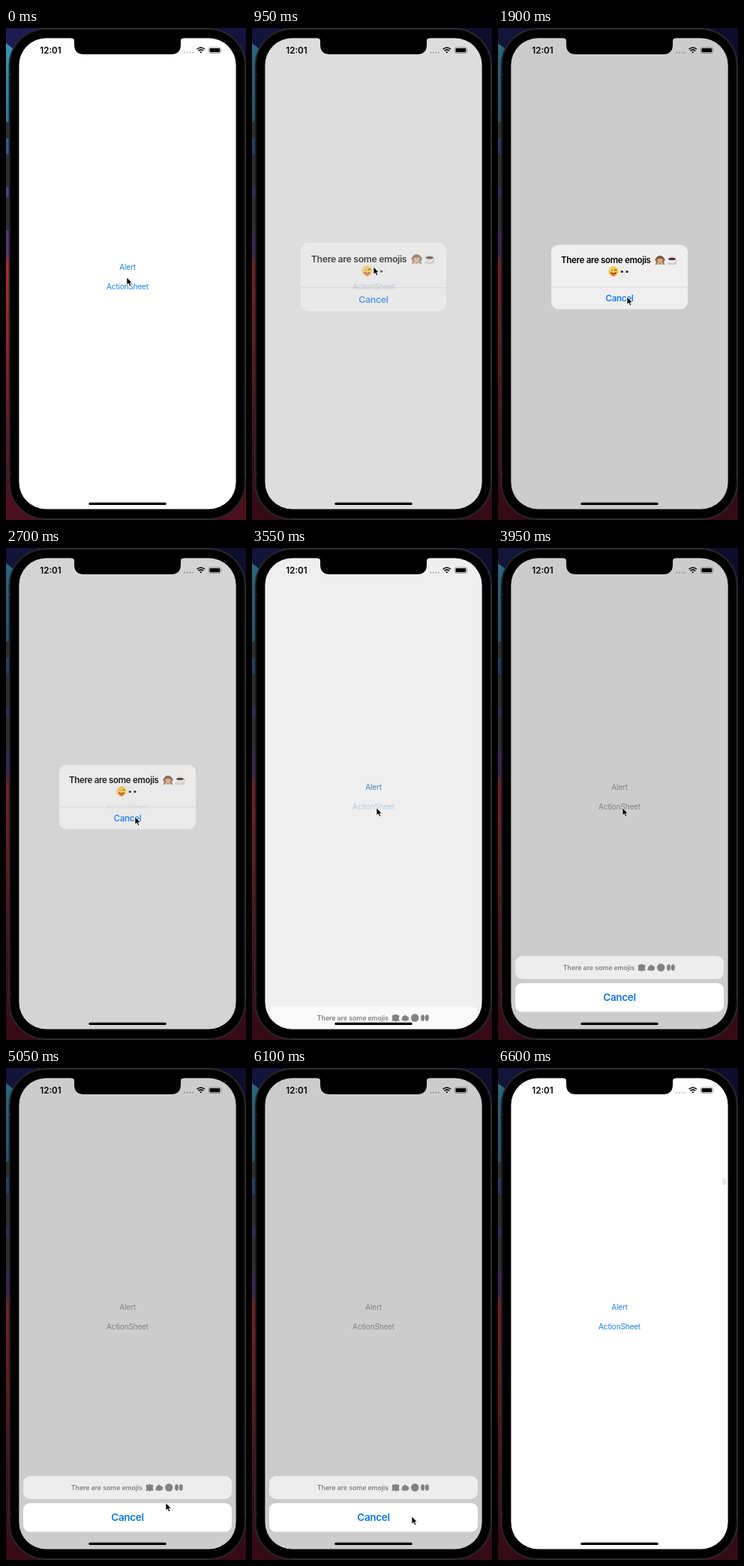
Animation of 320x655 px, one loop 7270 ms. Source, as an HTML page:

```html
<!DOCTYPE html>
<html lang="en">
<head>
<meta charset="utf-8">
<title>Alert and action sheet</title>
<style>
  html, body { margin: 0; width: 100%; height: 100%; overflow: hidden; background: #000; }
  svg { display: block; width: 320px; height: 655px; font-family: Inter, Roboto, sans-serif; }
  .mid { text-anchor: middle; }
  .link { font-size: 10px; letter-spacing: -.015em; }
  .bold { font-weight: 600; letter-spacing: -.026em; }
</style>
</head>
<body>
<svg viewBox="0 0 320 655">
  <defs>
    <linearGradient id="wall" x2="0" y2="1">
      <stop offset=".03" stop-color="#3a92b8"/>
      <stop offset=".17" stop-color="#2f7aa6"/>
      <stop offset=".25" stop-color="#2b5796"/>
      <stop offset=".33" stop-color="#45408c"/>
      <stop offset=".46" stop-color="#5e3079"/>
      <stop offset=".48" stop-color="#ad2b30"/>
      <stop offset=".62" stop-color="#9c2426"/>
      <stop offset=".85" stop-color="#5c1424"/>
      <stop offset="1" stop-color="#4a0f20"/>
    </linearGradient>
    <clipPath id="screen"><rect x="17.4" y="13.4" width="289.200" height="627.200" rx="36"/></clipPath>
    <clipPath id="card"><rect x="71" y="288.7" width="182" height="85.6" rx="9.5"/></clipPath>
  </defs>

  <!-- desktop and phone body -->
  <rect width="160" height="655" fill="url(#wall)"/>
  <path d="M0 0H160V60H50L0 20Z" fill="#1d1b52"/>
  <path d="M160 0H320V330H160Z" fill="#15133f"/>
  <path d="M160 330H320V655H160Z" fill="#4d0f20"/>
  <rect id="shade" width="320" height="655" opacity="0"/>
  <path d="M0 125H5V147H0ZM0 168H5V212H0ZM0 225H5V269H0Z" fill="#2c2d31"/>
  <rect x="4" y=".5" width="315.5" height="654" rx="49" fill="#000" stroke="#363638"/>
  <rect x="5.2" y="1.7" width="313" height="651.6" rx="47.8" fill="none" stroke="#202021" stroke-width="1.4"/>
  <path d="M4 62H6.500M317.500 62H320M4 593H6.500M317.500 593H320" stroke="#2e2e2f" stroke-width="2"/>

  <g clip-path="url(#screen)">
    <rect x="17" y="13" width="290" height="628" fill="#fff"/>
    <text id="alertLink" class="mid link" x="162" y="322.3">Alert</text>
    <text id="sheetLink" class="mid link" x="162" y="348">ActionSheet</text>

    <!-- status bar -->
    <text x="45.3" y="34" font-size="11.6" font-weight="600">12:01</text>
    <path d="M238.3 32.8h.01M242 32.8h.01M245.6 32.8h.01M249.2 32.8h.01" stroke="#b5b5b5" stroke-width="2" stroke-linecap="round"/>
    <g fill="none" stroke="#000" stroke-width="1.5">
      <path d="M254.6 28.3Q259.8 23.7 265 28.3M256.5 30.4Q259.8 27.4 263.1 30.4"/>
      <path d="M258.2 31.8Q259.8 30.5 261.4 31.8L259.8 33.5Z" fill="#000" stroke="none"/>
    </g>
    <rect x="270.4" y="25.9" width="16" height="7.6" rx="2.2" fill="none" stroke="#8a8a8a" stroke-width=".8"/>
    <rect x="271.6" y="27.1" width="13.6" height="5.2" rx="1.1"/>
    <path d="M287.3 28.4q1.2 1.3 0 2.6z" fill="#8a8a8a"/>
    <path id="ghost" d="M299 145L306.5 151V158L303 155L299 156Z" fill="#e9ebeb"/>
    <rect id="dim" x="17" y="13" width="290" height="628" opacity="0"/>

    <!-- alert -->
    <g id="alert">
      <g clip-path="url(#card)">
        <rect x="71" y="288" width="182" height="87" fill="#efefef"/>
        <rect id="alertPress" x="71" y="345" width="182" height="30" fill="#d9d9d9"/>
        <path d="M71 344.8H253" stroke="#d2d2d2" stroke-width=".8"/>
      </g>
      <text class="bold" x="84" y="313" font-size="11.5">There are some emojis</text>
      <g transform="translate(216 309)">
        <circle cx="-5" cy="-.6" r="2" fill="#c99d77"/>
        <circle cx="5" cy="-.6" r="2" fill="#c99d77"/>
        <circle r="5.9" fill="#7d5a40"/>
        <ellipse cy="3" rx="4.2" ry="3" fill="#e2bf98"/>
        <path d="M-6.5 6.500L-4 -1L0 -2.2L4 -1L6.5 6.500L3.5 5.5L1.5 1.5H-1.5L-3.5 5.5Z" fill="#a67c5b"/>
        <path d="M-3.6 -1.2L-.4 -2V1.4H-3ZM3.6 -1.2L.4 -2V1.4H3Z" fill="#dcb58d"/>
        <path d="M-1.4 4.2Q0 5 1.4 4.2" fill="none" stroke="#5b3b28" stroke-width=".7"/>
      </g>
      <g transform="translate(232 309)">
        <ellipse cy="4.5" rx="6.7" ry="1.7" fill="#c9cccf"/>
        <path d="M4 -.8Q7.4 -1.2 6 1.6Q5 3 3 2.6" fill="none" stroke="#b7babd" stroke-width="1.1"/>
        <path d="M-4.8 -1.6H4.8Q4.6 4.6 0 4.6Q-4.6 4.6 -4.8 -1.6Z" fill="#e3e5e7"/>
        <ellipse cy="-1.6" rx="4.8" ry="1.7" fill="#4c3023"/>
        <path d="M-1.5 -3.5q-1 -1.2 0 -2.4M1.5 -3.5q-1 -1.2 0 -2.4" fill="none" stroke="#bbb" stroke-width=".8"/>
      </g>
      <g transform="translate(154 324)">
        <circle r="6.7" fill="#f8c83c"/>
        <circle cx="-2.4" cy="-1.6" r="1.7" fill="#fff"/>
        <circle cx="-2.2" cy="-1.5" r=".9" fill="#4b2e12"/>
        <path d="M1.2 -1.4Q2.8 -3 4.3 -1.4" fill="none" stroke="#4b2e12" stroke-width="1"/>
        <path d="M-4 1.2Q0 2.8 4 1.2Q3.4 4.4 0 4.4Q-3.4 4.4 -4 1.2Z" fill="#6c3615"/>
        <path d="M-1.9 2.5H1.9V4.8Q1.6 6.4 0 6.4Q-1.6 6.4 -1.9 4.8Z" fill="#ee5564"/>
      </g>
      <g transform="translate(169.5 324)">
        <g fill="#fff" stroke="#c8c8c8" stroke-width=".6">
          <ellipse cx="-3.4" rx="3" ry="4.9"/><ellipse cx="3.4" rx="3" ry="4.9"/>
        </g>
        <circle cx="-4.2" cy=".4" r="1.6" fill="#222"/><circle cx="2.6" cy=".4" r="1.6" fill="#222"/>
      </g>
      <text class="mid bold" x="162" y="363.6" font-size="11.5" fill="#1a7ef0">Cancel</text>
    </g>

    <!-- action sheet -->
    <g id="sheet">
      <rect x="23" y="543.3" width="278" height="30.4" rx="8.8" fill="#fff" opacity=".66"/>
      <g fill="#828282">
        <text x="86.8" y="561.8" font-size="8.8" font-weight="600" letter-spacing="-.05">There are some emojis</text>
        <path d="M187 555.2Q188 554 189 555Q191.5 552.8 194 555Q195 554 196 555.2Q197 557 195.7 558.5L196.5 563L193.5 562.5Q191.5 564.5 189.5 562.5L186.5 563L187.3 558.5Q186 557 187 555.2Z"/>
        <path d="M200.3 557.2Q202 555.8 203.3 555.6L204 553.7L205.2 555.7Q207.5 556 208.3 557.5Q210.4 558.3 208.6 560Q210 560.8 208.5 561.7Q204.5 563.8 200.3 561.9Q198 561 200 560Z"/>
        <circle cx="217.2" cy="558.5" r="5.2"/>
        <ellipse cx="227.6" cy="558.5" rx="2.5" ry="4.2"/>
        <ellipse cx="233.3" cy="558.5" rx="2.5" ry="4.2"/>
      </g>
      <rect id="sheetCancel" x="23" y="579.2" width="278" height="38.3" rx="8.8"/>
      <text class="mid bold" x="162" y="603.2" font-size="13.6" fill="#1379dd">Cancel</text>
    </g>
    <rect x="110.3" y="631.8" width="103.4" height="3.3" rx="1.65"/>
  </g>
  <path d="M87 12.5V13.4Q91 13.4 91 17V22Q91 35 104 35H220Q233 35 233 22V17Q233 13.4 237 13.4V12.5Z"/>
  <path id="cursor" d="M0 0V10L2.3 7.9L4 11.6L5.8 10.8L4.2 7.3H7.2Z" stroke="#fff" stroke-width=".7"/>
</svg>

<script>
const LOOP = 7270, STEP = 50;
const $ = id => document.getElementById(id);
const set = (id, attrs) => {
  for (const key in attrs) $(id).setAttribute(key, attrs[key]);
};
const ramp = (t, a, b) => Math.min(1, Math.max(0, (t - a) / (b - a)));
const smooth = p => p * p * (3 - 2 * p);

// critically damped spring, settles in about 0.4 s
const spring = (t, start) => {
  const x = Math.max(0, t - start) * 0.022855;
  return 1 - Math.exp(-x) * (1 + x);
};

// pointer moves: start, end, x, y
const moves = [
  [-1, 0, 161, 332], [199, 200, 162, 318], [1450, 1900, 172, 358],
  [3050, 3350, 166, 346], [4350, 5050, 213, 579],
  [5450, 5600, 213, 597], [6150, 6600, 299, 146]
];

function pointer(t) {
  let x = 0, y = 0;
  for (const [a, b, toX, toY] of moves) {
    const p = smooth(ramp(t, a, b));
    x += (toX - x) * p;
    y += (toY - y) * p;
  }
  return `translate(${x} ${y})`;
}

function draw(t) {
  const alertIn = spring(t, 850), alertOut = spring(t, 2670);
  const sheetIn = spring(t, 3500), sheetOut = spring(t, 6180);
  const alert = t < 3150 ? alertIn * (1 - alertOut) : 0;
  const sheet = t < 6600 ? sheetIn * (1 - sheetOut) : 0;
  const dim = Math.max(alert, sheet);

  const tint = [28, 127, 220].map(c => Math.round(c + (163 - c) * dim));
  const fill = `rgb(${tint})`;
  set('alertLink', { fill, opacity: t < 850 ? 1 : .2 + .8 * ramp(t, 950, 1250) });
  set('sheetLink', { fill, opacity: t < 3450 ? 1 : .3 + .7 * ramp(t, 3540, 3900) });

  const scale = 1.2 - .2 * alertIn;
  set('alert', {
    opacity: alert,
    transform: `translate(162 331.5) scale(${scale}) translate(-162 -331.5)`
  });
  set('alertPress', { opacity: t < 2650 ? ramp(t, 2150, 2300) : 0 });

  const press = t < 6100 ? ramp(t, 5600, 5700) : 0;
  const white = Math.round(255 - 27 * press);
  set('sheet', { transform: `translate(0 ${98 * (1 - sheet)})` });
  set('sheetCancel', { fill: `rgb(${[white, white, white]})` });

  set('dim', { opacity: .2 * dim });
  set('shade', { opacity: .3 * ramp(t, 350, 500) });
  set('ghost', { opacity: t >= 6600 ? 1 : 0 });
  set('cursor', { transform: pointer(t), opacity: t < 6600 ? 1 : 0 });
}

const begin = performance.now();
function tick() {
  const t = (performance.now() - begin) % LOOP;
  draw(Math.floor(t / STEP) * STEP);
  requestAnimationFrame(tick);
}
tick();
</script>
</body>
</html>
```
